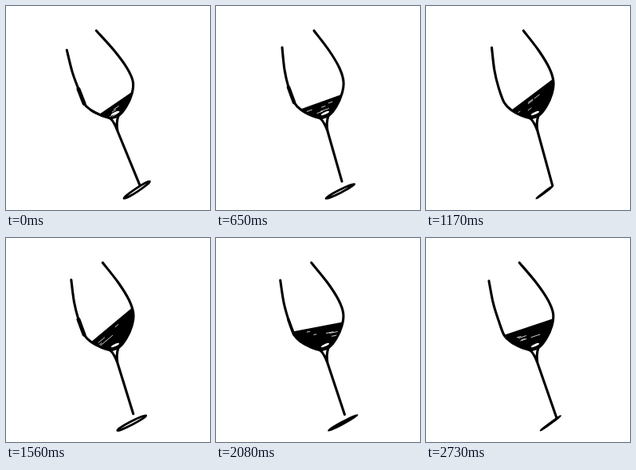
An HTML page for the animation above (2.86 s loop, 256 by 256 pixels).

```html
<!DOCTYPE html>
<html lang="en">
<head>
<meta charset="utf-8">
<title>Wine glass</title>
<style>
  html, body { margin: 0; width: 100%; height: 100%; overflow: hidden; background: #fff; }
  svg { display: block; width: 100vw; height: 100vh; }
  .ink { fill: none; stroke: #000; stroke-width: 3.1; stroke-linecap: round; stroke-linejoin: round; }
  #streaks { fill: none; stroke: #fff; stroke-width: 0.8; stroke-linecap: round; }
  #foot { fill: #fff; stroke-width: 2.8; }
</style>
</head>
<body>
<svg viewBox="0 0 256 256">
  <clipPath id="inside"><path id="bowl"/></clipPath>
  <g clip-path="url(#inside)">
    <path id="wine"/>
    <path id="streaks"/>
  </g>
  <ellipse cx="137" cy="134.5" rx="5.5" ry="1.5" fill="#fff" transform="rotate(-25 137 134.5)"/>
  <path id="left" class="ink"/>
  <path id="right" class="ink"/>
  <path id="blot" class="ink"/>
  <ellipse id="foot" class="ink"/>
  <path id="stem" class="ink"/>
</svg>
<script>
const STEP = 130, COUNT = 22;
const LEFT = [[83, 52], [86, 80], [91, 102], [98, 121], [107, 130.5], [119, 137], [131, 141]];
const RIGHT = [[123, 31], [142, 56], [155, 78], [160, 95], [158, 110], [151, 126], [142, 137], [131, 141]];

const el = id => document.getElementById(id);
const setPath = (id, d) => el(id).setAttribute("d", d);
const clamp = v => Math.min(1, Math.max(0, v));
const smooth = k => k * k * (3 - 2 * k);

// Cosine with a number of cycles per loop, highest at step "peak"
const wave = (n, cycles, peak) => Math.cos(2 * Math.PI * cycles * (n - peak) / COUNT);

function random(seed) {
  return () => {
    seed = (seed * 16807) % 2147483647;
    return seed / 2147483647;
  };
}

// Catmull-Rom curve through the points
function curve(p) {
  let d = "M" + p[0];
  for (let i = 0; i < p.length - 1; i++) {
    const a = p[i - 1] || p[i], b = p[i], c = p[i + 1], e = p[i + 2] || c;
    d += `C${b[0] + (c[0] - a[0]) / 6} ${b[1] + (c[1] - a[1]) / 6} ` +
         `${c[0] - (e[0] - b[0]) / 6} ${c[1] - (e[1] - b[1]) / 6} ${c}`;
  }
  return d;
}

// Quick swing upright, then a slow fall back
const leanAt = n => n < 5 ? 1 - (n / 5) ** 1.6 : 0.6 * ((n - 5) / 16) ** 1.5;

function drawBowl(lean, open) {
  const tip = ([x, y]) => [
    x + lean * 0.14 * Math.min(y - 100, 0),
    y + lean * 0.12 * Math.max(110 - x, 0)
  ];
  const left = LEFT.map(tip), right = RIGHT.map(tip);
  setPath("left", curve(left));
  setPath("right", curve(right));
  setPath("bowl", curve([...left, ...right.reverse().slice(1)]) + "Z");
  setPath("blot", `M${left[2]}L${left[3]}`);
  el("blot").style.strokeWidth = 2 + 3 * open;
}

function drawWine(n) {
  const level = 127 - 16 * smooth(clamp(n / 12));
  const slope = 0.5 + 0.25 * wave(n, 1, 7) + 0.4 * wave(n, 2, 1.2) + 0.15 * wave(n, 3, 2);
  const surface = x => level - slope * (x - 130);
  setPath("wine", `M80 ${surface(80)}L180 ${surface(180)}V180H80Z`);

  const rand = random(97 + n * 31);
  let d = "";
  for (let i = 0; i < 5; i++) {
    const x = 114 + 32 * rand(), depth = 4 + 12 * rand(), size = 3 + 8 * rand();
    d += `M${x} ${surface(x) + depth}L${x + size} ${surface(x + size) + depth}`;
  }
  setPath("streaks", d);
}

function drawStand(n, lean, open) {
  const reach = clamp(0.75 + 0.9 * wave(n, 2, 2.7));
  const x = 158 + 10 * lean, y = 225 - 5 * reach + 4 * lean;
  setPath("stem", `M131 141Q136 146 140 157M141 138Q138 146 140 157L${x} ${y}`);

  // The foot hangs from its left end and grows past the stem
  const width = 20 + 16 * reach, slope = -0.76 + 0.26 * reach - 0.1 * lean;
  const cx = x - 20 + width / 2, cy = 241.5 + slope * width / 2;
  const foot = el("foot");
  foot.setAttribute("rx", Math.hypot(width, slope * width) / 2);
  foot.setAttribute("ry", 0.4 + 1.7 * open);
  foot.setAttribute("transform",
    `translate(${cx} ${cy}) rotate(${Math.atan(slope) * 180 / Math.PI})`);
}

function draw(n) {
  const lean = leanAt(n);
  const open = Math.abs(Math.cos(Math.PI * n / 6));
  drawBowl(lean, open);
  drawWine(n);
  drawStand(n, lean, open);
}

const start = performance.now();
function tick() {
  draw(Math.floor((performance.now() - start) / STEP) % COUNT);
  requestAnimationFrame(tick);
}
tick();
</script>
</body>
</html>
```
